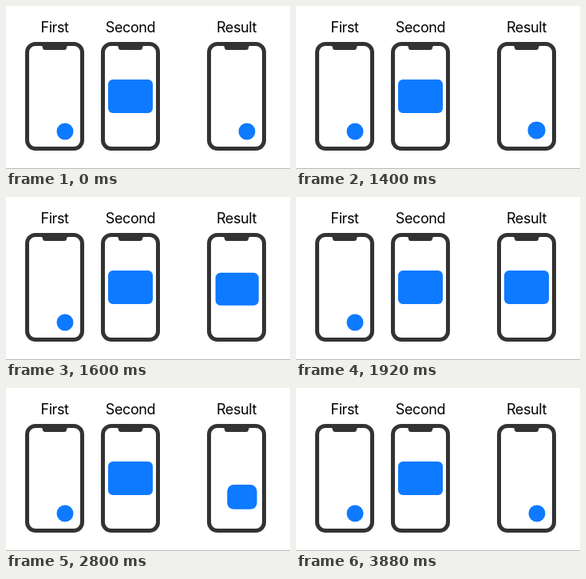
An HTML page for the animation above (5200 ms loop, 356 by 204 pixels).

```html
<!DOCTYPE html>
<html lang="en">
<head>
<meta charset="utf-8">
<title>Shape transition</title>
<style>
  html, body { margin: 0; width: 100%; height: 100%; overflow: hidden; background: #fff; }
  svg { display: block; width: 356px; height: 204px; }
  text { font: 18px Inter, sans-serif; letter-spacing: -.4px; text-anchor: middle; }
  .shape { fill: #0d7aff; }
</style>
</head>
<body>
<svg viewBox="0 0 356 204">
  <defs>
    <g id="phone" fill="#333">
      <rect x="2.5" y="2.5" width="69" height="131" rx="10.5" fill="#fff" stroke="#333" stroke-width="5"/>
      <path d="M20 4H54V5Q52 5 52 7Q52 10 49 10H25Q22 10 22 7Q22 5 20 5Z"/>
    </g>
  </defs>
  <path d="M0 203.5H356" stroke="#b8b8b8"/>
  <g transform="translate(24 45)">
    <use href="#phone"/><text x="37" y="-12.5">First</text><rect class="shape"/>
  </g>
  <g transform="translate(119 45)">
    <use href="#phone"/><text x="37" y="-12.5">Second</text><rect class="shape"/>
  </g>
  <g transform="translate(252 45)">
    <use href="#phone"/><text x="37" y="-12.5">Result</text><rect class="shape"/>
  </g>
</svg>
<script>
const LOOP = 5200, STEP = 40, DURATION = 300, GROW = 1385, SHRINK = 2707;
const circle = { x: 39.5, y: 101.5, width: 21, height: 21, rx: 10.5 };
const card = { x: 9, y: 47, width: 56, height: 42, rx: 6 };
const [first, second, result] = document.querySelectorAll('.shape');

// cubic-bezier(.25, .1, .25, 1), solved by bisection
function ease(x) {
  if (x <= 0) return 0;
  if (x >= 1) return 1;
  const bezier = (a, b, s) => 3 * a * s * (1 - s) ** 2 + 3 * b * s * s * (1 - s) + s ** 3;
  let low = 0, high = 1;
  for (let i = 0; i < 20; i++) {
    const mid = (low + high) / 2;
    if (bezier(.25, .25, mid) < x) low = mid; else high = mid;
  }
  return bezier(.1, 1, low);
}

function morph(rect, p) {
  for (const key in circle) rect.setAttribute(key, circle[key] + (card[key] - circle[key]) * p);
}

function draw() {
  const time = Math.floor(performance.now() % LOOP / STEP) * STEP;
  morph(result, ease((time - GROW) / DURATION) - ease((time - SHRINK) / DURATION));
  requestAnimationFrame(draw);
}

morph(first, 0);
morph(second, 1);
draw();
</script>
</body>
</html>
```
